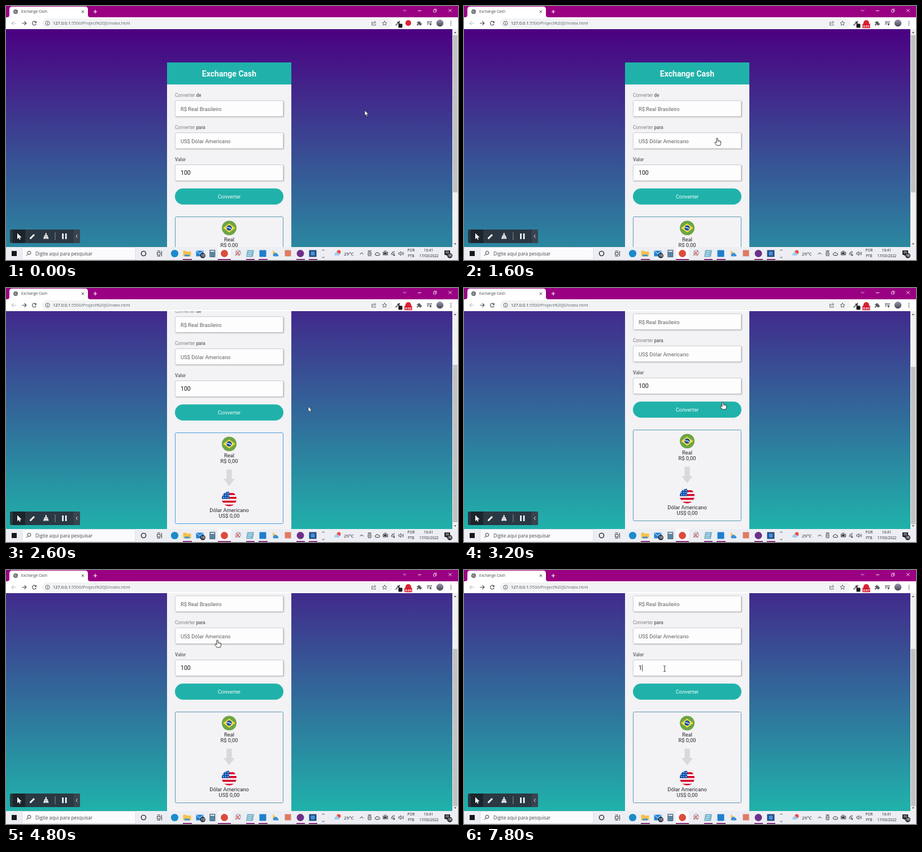
An HTML page with a canvas for the animation above (8000 ms loop, 800 by 450 pixels).

```html
<!DOCTYPE html>
<html lang="pt-BR">
<head>
<meta charset="utf-8">
<title>Exchange Cash</title>
<style>
html, body { margin: 0; width: 100%; height: 100%; overflow: hidden; background: #fff; }
canvas { display: block; width: 800px; height: 450px; }
</style>
</head>
<body>
<canvas id="stage" width="800" height="450"></canvas>
<script>
const ctx = document.getElementById('stage').getContext('2d');
const LOOP = 8000, STEP = 200;
const TOP = 41, BOTTOM = 427, MAX_SCROLL = 122;
const PAGE_H = BOTTOM - TOP + MAX_SCROLL;
const TEAL = '#20b2aa', PURPLE = '#9a0082', CARD = '#f3f2f5';
const ROBOTO = 'Roboto, sans-serif', UI = '"Open Sans", sans-serif';
const APP = 'Exchange Cash';

// Drawing helpers
function rect(x, y, w, h, color, r = 0) {
  ctx.fillStyle = color;
  ctx.beginPath();
  ctx.roundRect(x, y, w, h, r);
  ctx.fill();
}
function circle(x, y, r, color) {
  ctx.fillStyle = color;
  ctx.beginPath();
  ctx.arc(x, y, r, 0, Math.PI * 2);
  ctx.fill();
}
function ring(x, y, r, color, width = 1) {
  ctx.strokeStyle = color;
  ctx.lineWidth = width;
  ctx.beginPath();
  ctx.arc(x, y, r, 0, Math.PI * 2);
  ctx.stroke();
}
function frame(x, y, w, h, color, r = 0, width = 1) {
  ctx.strokeStyle = color;
  ctx.lineWidth = width;
  ctx.beginPath();
  ctx.roundRect(x, y, w, h, r);
  ctx.stroke();
}
function shape(x, y, d, fill, stroke, width = 1) {
  const path = new Path2D(d);
  ctx.save();
  ctx.translate(x, y);
  if (fill) { ctx.fillStyle = fill; ctx.fill(path); }
  if (stroke) {
    ctx.strokeStyle = stroke;
    ctx.lineWidth = width;
    ctx.lineJoin = 'round';
    ctx.stroke(path);
  }
  ctx.restore();
}
const line = (x, y, d, color, width) => shape(x, y, d, null, color, width);
function text(s, x, y, font, color, align = 'left') {
  ctx.font = font;
  ctx.fillStyle = color;
  ctx.textAlign = align;
  ctx.fillText(s, x, y);
  return ctx.measureText(s).width;
}

// Motion: [time, values...] with smooth steps between keys
const POINTER = [[0, 635, 185], [400, 635, 185], [1200, 468, 205], [1600, 448, 234],
  [1800, 448, 234], [2200, 535, 210], [2800, 535, 210], [3600, 381, 194],
  [4000, 381, 194], [4800, 374, 124], [5200, 374, 124], [6000, 355, 175]];
const SCROLL = [[0, 0], [2000, 0], [2600, 117], [2800, MAX_SCROLL]];

function at(keys, t) {
  const i = keys.findIndex(k => k[0] > t);
  if (i < 0) return keys[keys.length - 1].slice(1);
  const a = keys[i - 1], b = keys[i];
  const u = (t - a[0]) / (b[0] - a[0]), e = u * u * (3 - 2 * u);
  return a.slice(1).map((v, n) => v + (b[n + 1] - v) * e);
}
const typed = t => t < 7200 ? '100' : t < 7400 ? '10' : '1';
const caretOn = t => t >= 7600 || (t >= 6800 && t < 7200);

// Web page, laid out at scroll 0
function label(word, strong, y) {
  const w = word ? text(word + ' ', 299, y, '8.19px ' + ROBOTO, '#828282') : 0;
  text(strong, 299 + w, y, 'bold 8.19px ' + ROBOTO, '#747474');
}
function field(y) {
  ctx.save();
  ctx.shadowColor = 'rgba(0,0,0,.3)';
  ctx.shadowBlur = 2;
  ctx.shadowOffsetX = ctx.shadowOffsetY = 1;
  rect(299, y, 192, 28.5, '#fdfdfe', 2);
  ctx.restore();
  frame(299.5, y + .5, 191, 28, '#c3c5c8', 2, .8);
}
function roundFlag(x, y, paint) {
  ctx.save();
  ctx.beginPath();
  ctx.arc(x, y, 13, 0, Math.PI * 2);
  ctx.clip();
  ctx.translate(x - 13, y - 13);
  paint();
  ctx.restore();
}
function brazil() {
  rect(0, 0, 26, 26, '#6da544');
  shape(0, 0, 'M13 5L23.7 13 13 21 2.3 13Z', '#ffda44');
  circle(13, 13, 4.6, '#0052b4');
  line(0, 0, 'M8.6 12.3Q13.5 11.4 17 15.2', '#f0f0f0', 1.2);
}
function usa() {
  rect(0, 0, 26, 26, '#f4f4f4');
  for (let i = 0; i < 4; i++) rect(0, 2.8 + i * 6.78, 26, 3.4, '#d80027');
  rect(0, 0, 13, 13, '#0052b4');
  for (let r = 0; r < 3; r++)
    for (let c = 0; c < 3; c++) circle(3 + c * 4, 3 + r * 3.8, .9, '#f0f0f0');
}
function page(t, scroll) {
  ctx.save();
  ctx.beginPath();
  ctx.rect(0, TOP, 790, BOTTOM - TOP);
  ctx.clip();
  ctx.translate(0, -scroll);
  const sky = ctx.createLinearGradient(0, TOP, 0, TOP + PAGE_H);
  sky.addColorStop(0, '#4b0082');
  sky.addColorStop(1, TEAL);
  rect(0, TOP, 790, PAGE_H, sky);

  rect(285, 100, 220, 460, CARD);
  rect(285, 100, 220, 39, TEAL);
  text(APP, 395, 125, 'bold 14.04px ' + ROBOTO, '#f8fbfb', 'center');

  const body = '9.36px ' + ROBOTO;
  label('Converter', 'de', 161);
  field(167.3);
  text('R$ Real Brasileiro', 309, 185.8, body, '#606060');
  label('Converter', 'para', 218);
  field(224.2);
  text('US$ Dólar Americano', 309, 242.6, body, '#606060');
  label('', 'Valor', 275);
  field(281);
  const w = text(typed(t), 309, 299, '10.53px ' + ROBOTO, '#15151a');
  if (caretOn(t)) rect(309.3 + w, 289.5, .8, 12, '#222');

  rect(299, 323.3, 192, 28.4, TEAL, 14.2);
  text('Converter', 395, 340.6, body, '#f4fbfb', 'center');

  frame(299.5, 373.5, 191, 161, scroll > 60 && scroll < 121 ? '#4a9fda' : '#5b98b4', 2);
  roundFlag(395, 393.2, brazil);
  text('Real', 395, 417, body, '#25252a', 'center');
  text('R$ 0,00', 395, 427.3, body, '#25252a', 'center');
  shape(395, 438.5, 'M-4.7 0H4.7V16.5H10L0 29.5-10 16.5H-4.7Z', '#d9d9db');
  roundFlag(395, 490.5, usa);
  text('Dólar Americano', 395, 514, body, '#25252a', 'center');
  text('US$ 0,00', 395, 524.4, body, '#25252a', 'center');
  ctx.restore();
}
function scrollbar(scroll) {
  rect(790, TOP, 10, BOTTOM - TOP, '#f1f1f1');
  const track = 367, ratio = track / PAGE_H;
  rect(791, 51.5 + scroll * ratio, 8, (BOTTOM - TOP) * ratio, '#c1c1c1');
  shape(795, 45.5, 'M-2.2 2.5H2.2L0 0Z', '#505050');
  shape(795, 420.5, 'M-2.2 0H2.2L0 2.5Z', '#505050');
}

// Browser window
function browser(t) {
  const ink = '#55595e';
  rect(0, 0, 800, 20, PURPLE);
  shape(0, 0, 'M2 20Q6 20 6 16V6Q6 1 11 1H140Q145 1 145 6V16Q145 20 149 20Z', '#fff');
  circle(17, 10, 4, '#5f6368');
  line(17, 10, 'M-3-1Q0 1 1-3M-2 2Q1 0 3 1', '#e4e4e6', .9);
  text(APP, 27, 12.4, '6.6px ' + UI, '#44474b');
  line(136, 10, 'M-2.2-2.2L2.2 2.2M2.2-2.2L-2.2 2.2', '#505357', 1);
  line(158, 10, 'M-3.2 0H3.2M0-3.2V3.2', '#fff', 1.2);
  const white = '#f3dff0';
  line(705.5, 8, 'M-2.8-1.4L0 1.4 2.8-1.4', white, .9);
  line(732, 8.5, 'M-3 0H3', white, 1);
  line(759, 8, 'M-2.5-1H1.5V3H-2.5ZM-1-1V-2.5H3V1.5H1.5', white, .8);
  line(786, 8, 'M-2.7-2.7L2.7 2.7M2.7-2.7L-2.7 2.7', white, .9);

  rect(0, 20, 800, 21, '#fff');
  rect(64, 22, 620, 17, '#f1f3f4', 8.5);
  const arrow = 'M-3.8 0H3.8M.4-3.4L3.8 0 .4 3.4';
  line(32, 30.5, arrow, '#4c5055', 1.2);
  line(14, 30.5, 'M3.8 0H-3.8M-.4-3.4L-3.8 0-.4 3.4', '#bfc2c6', 1.1);
  line(50, 30.5, 'M3-1.6A3.4 3.4 0 1 0 3.3 1', '#4c5055', 1.2);
  shape(50, 30.5, 'M3.9-4V-.4H.3Z', '#4c5055');
  ring(73.5, 30.5, 3.6, ink, .9);
  rect(73, 30, 1, 2.6, ink);
  rect(73, 28.3, 1, 1, ink);
  const w = text('127.0.0.1', 83, 33.3, '7.4px ' + UI, '#26282c');
  text(':5500/Project%20JS/index.html', 83 + w, 33.3, '7.4px ' + UI, '#5f6368');

  line(651, 30.5, 'M-1.5-2H-3.5V3.5H3V1.5M-1.8 1.2Q-1.4-1.6 2-1.6M.8-4L3.6-1.6.8.7', ink, .9);
  line(670, 30.5, 'M0-4L1.2-1.3 4-1 1.9.9 2.5 3.7 0 2.2-2.5 3.7-1.9.9-4-1-1.2-1.3Z', ink, .9);
  line(693, 31, 'M-3.5 3.5L1.5-1.5', '#70757b', 2);
  line(693, 31, 'M0-3L3.5.5M2-2L4-4', '#33363b', 1.8);
  rect(694.5, 31.5, 7, 7, '#16171a', 1);
  circle(712, 30.2, 5.1, '#d62632');
  if (t >= 1000) {
    rect(705.3, 31.4, 13.4, 7.8, '#d4142a', 1);
    text('0:0' + Math.floor(t / 1000), 712, 37.5, 'bold 5.6px ' + UI, '#fff', 'center');
  }
  shape(731, 30.5, 'M-4-2H-1.5A1.4 1.4 0 1 1 1.2-2H3V.2A1.4 1.4 0 1 1 3 2.8V4H.8A1.3 1.3 0 1 0-1.7 4H-4V1.8A1.3 1.3 0 1 0-4-.5Z', '#55595e');
  line(749, 30.5, 'M-4-3H1.5M-4-.6H1.5M-4 1.8H-1M3 2V-3H5', ink, 1.1);
  circle(2 + 749.3, 32.7, 1.6, ink);
  const photo = ctx.createLinearGradient(0, 24, 0, 37);
  photo.addColorStop(0, '#9899ac');
  photo.addColorStop(1, '#45434f');
  circle(768, 30.3, 6.2, photo);
  for (const y of [27.3, 30.5, 33.7]) circle(787.5, y, .9, ink);
}

function recorder() {
  rect(7, 396, 124, 24, 'rgba(43,53,64,.96)', 2);
  rect(12, 396, 22, 24, '#1c242c');
  rect(119.5, 396, 11.5, 24, '#39444f', 2);
  shape(20, 402.5, 'M0 0V10.5L2.5 8.2 4.1 11.6 5.8 10.8 4.2 7.5H7.6Z', '#fff');
  line(47, 408, 'M-3.3 3.3L3-3', '#fff', 3);
  shape(47, 408, 'M-5 5L-4.4 1.6-1.6 4.4Z', '#fff');
  rect(69.8, 402, 2, 5, '#fff', 1);
  shape(70.8, 406, 'M-2.8 0H2.8L4.7 6.5H-4.7Z', '#fff');
  line(70.8, 406, 'M-3.2 2H3.2M-1 4V6.5M1.5 4V6.5', '#2b3540', .7);
  rect(86.5, 401, 1, 14, '#89929a');
  rect(99.3, 403, 2.6, 10, '#fff');
  rect(104.8, 403, 2.6, 10, '#fff');
  line(125.3, 408, 'M1.3-3L-1.3 0 1.3 3', '#dfe4e8', 1);
}

// Desktop taskbar
function taskbar() {
  const ink = '#222326';
  rect(0, BOTTOM, 800, 23, '#eceef3');
  rect(10, 434, 9, 9, '#16181c');
  rect(28.5, BOTTOM, 200.5, 22.5, '#fbfbfd');
  frame(28.5, BOTTOM + .5, 200.5, 22, '#d2d3d8', 0, .7);
  ring(41, 437.3, 2.9, ink, .9);
  line(39, 439.5, 'M0 0L-3 3', ink, 1);
  text('Digite aqui para pesquisar', 52, 441.6, '8.3px ' + UI, '#45474b');
  ring(243.5, 438.5, 4.1, ink, 1.4);
  line(271, 438.5, 'M-3.5-2H2V2.5H-3.5ZM-3.5-4.5H2M-3.5 4.7H2M4.5-4.5V5', ink, .9);

  rect(375, BOTTOM, 23, 23, '#fafafd');
  for (const [x, width] of [[313, 16], [375, 23], [425, 15], [447, 16], [514, 15], [536, 15]])
    rect(x, 448.3, width, 1.7, '#7e1771');

  circle(298.5, 438.5, 6.6, '#1c8bcb');
  shape(320.5, 438.5, 'M-7-5H-2L-.5-3.5H7V5H-7Z', '#f4c24c');
  rect(316, 440.5, 9, 3, '#3d93d6');
  rect(336.5, 433.5, 13, 10, '#2181d2');
  line(343, 434, 'M-6 0L0 5 6 0', '#e8f4ff', 1);
  circle(348.3, 442.2, 4.6, '#30333a');
  text('13', 348.3, 444.2, 'bold 5.4px ' + UI, '#fff', 'center');
  rect(360.3, 432, 10, 13, '#47637b', 1);
  rect(361.6, 433.3, 7.4, 2.6, '#d7e5ef');
  for (let i = 0; i < 9; i++)
    rect(361.6 + i % 3 * 2.7, 437.3 + Math.floor(i / 3) * 2.4, 1.8, 1.5, '#74b8dc');
  circle(386.5, 438.5, 6.4, '#dc4c3c');
  ring(411, 437, 4.3, '#b9bcc5', 2);
  line(410, 438, 'M-4 4L4-4M-2-3L4 4', '#d65a5d', 1.3);
  shape(432, 438.5, 'M-5-6H7L5 6H-7Z', '#78b4ca');
  line(432, 438.5, 'M-3-3H4M-4 0H3M-5 3H2', '#e7f5f9', .9);
  rect(448.5, 432.5, 12, 12, '#1f7fcb', 1);
  shape(477.5, 438.5, 'M-5-6L2 2H-5Z', '#f2bf3c');
  shape(477.5, 438.5, 'M-4 5A3 3 0 0 1-3 0Q1-3 3 1A2.3 2.3 0 0 1 4 5Z', '#3b8ed6');
  rect(493.5, 432.5, 11, 11, '#df7b64');
  circle(521, 438.5, 6.5, '#6d3089');
  rect(536.5, 432.5, 13, 12, '#24497c');
  rect(539.5, 435, 7, 7, '#3f92e0');

  line(561.5, 432.5, 'M-2 1L0-1 2 1M-2 12L0 14 2 12', ink, .9);
  circle(589, 436, 3.4, '#ee4a48');
  shape(586, 438.5, 'M-4 3.5A2.6 2.6 0 0 1-3-1Q0-4 2.4-.5A2.1 2.1 0 0 1 3 3.5Z', '#9fccf0');
  text('29°C', 598, 441.6, '8px ' + UI, ink);
  line(629.5, 438.5, 'M-3 1.5L0-1.5 3 1.5', ink, 1);
  frame(641, 436, 5, 6.5, ink, 1, .9);
  line(643.5, 434, 'M-3 0H3', ink, 1);
  circle(643.5, 439.2, 1, ink);
  line(657.5, 439, 'M-3 2.7A2 2 0 0 1-3-1Q-.5-4 2-1A1.9 1.9 0 0 1 2.8 2.7Z', ink, 1);
  frame(667.5, 436, 8, 5, ink, 0, .9);
  rect(668.8, 437.2, 5, 2.6, ink);
  line(670, 433.3, 'M0 2V0M2 2V0', ink, .8);
  line(688, 442, 'M-6-1A6 6 0 0 1 0-7M-3.6-.5A4 4 0 0 1 0-4.3', '#4a4b50', 1.1);
  circle(687, 441.2, 1.2, ink);
  shape(698, 438.5, 'M-3-1.4H-1.3L1-3.5V3.5L-1.3 1.4H-3Z', null, ink, .8);
  line(699, 438.5, 'M2-1.5Q3 0 2 1.5M3.6-3Q5.4 0 3.6 3', ink, .8);
  const small = '6.4px ' + UI;
  text('POR', 717, 435.4, small, ink, 'center');
  text('PTB', 717, 445.2, small, ink, 'center');
  text('16:41', 748, 435.4, small, ink, 'center');
  text('17/03/2022', 748.5, 445.2, small, ink, 'center');
  shape(781, 437, 'M-5-4H5V4H0L-2 6V4H-5Z', ink);
  line(781, 437, 'M-3-1.8H3M-3 .4H3', '#eceef3', .8);
  circle(785.5, 442.3, 4.6, '#34363c');
  text('15', 785.5, 444.3, 'bold 5.4px ' + UI, '#fff', 'center');
}

// The pointer's look follows what lies under it
function pointer(x, y, scroll) {
  const py = y + scroll;
  const inside = (top, h = 29) => x > 299 && x < 491 && py > top && py < top + h;
  if (inside(281)) {
    line(x, y, 'M-2-5Q0-5 0-4Q0-5 2-5M0-4V4M-2 5Q0 5 0 4Q0 5 2 5', '#26262a', .9);
  } else if (inside(167) || inside(224) || inside(323)) {
    shape(x, y, 'M-1.2.8Q0-.8 1.2.8V4.6Q2.5 3.7 3.3 5Q4.6 4.4 5.2 5.6Q6.7 5.2 6.7 7V9.3L5.4 13H-.8L-4.3 8.5Q-4.2 6.6-2.4 7.2L-1.2 8.5Z', '#fff', '#222', .9);
    line(x, y, 'M1.2 4.6V7M3.3 5V7M5.2 5.6V7.3', '#333', .6);
  } else {
    shape(x, y, 'M0 0V9.3L2.1 7.3 3.6 10.4 5.1 9.7 3.7 6.7H6.5Z', '#fff', '#25252b', .7);
  }
}

function draw(now) {
  const t = Math.floor(now % LOOP / STEP) * STEP;
  const [scroll] = at(SCROLL, t);
  const [x, y] = at(POINTER, t);
  ctx.clearRect(0, 0, 800, 450);
  page(t, scroll);
  scrollbar(scroll);
  browser(t);
  taskbar();
  recorder();
  pointer(x, y, scroll);
}

const start = performance.now();
function tick() {
  draw(performance.now() - start);
  requestAnimationFrame(tick);
}
tick();
</script>
</body>
</html>
```
